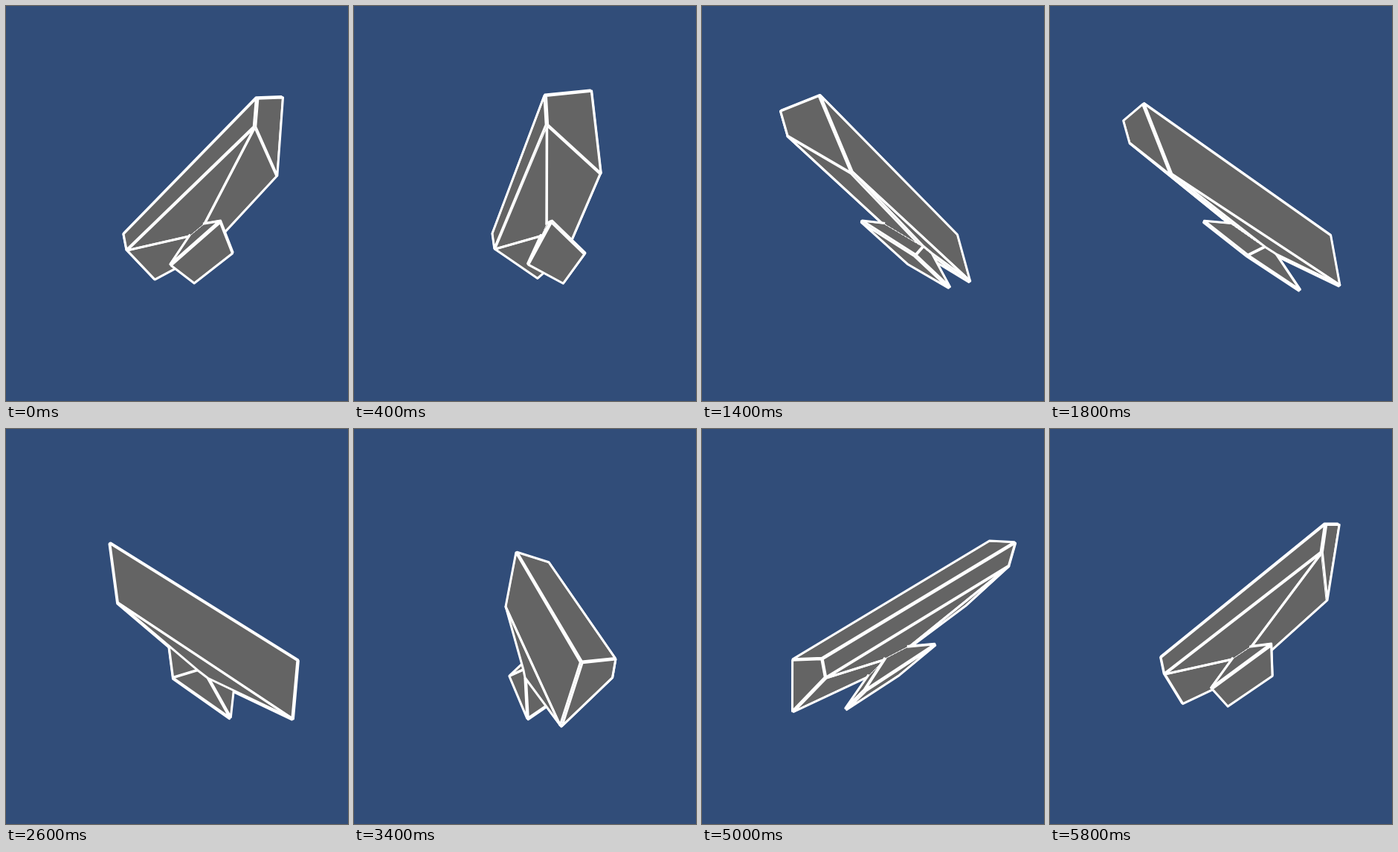
Recreate the animation shown at these times as an HTML page with a canvas. Size 460 by 530 pixels, loop 6 s.

```html
<!DOCTYPE html>
<html>
<head>
<meta charset="utf-8">
<style>
  html, body { margin: 0; width: 100%; height: 100%; overflow: hidden; background: #314d79; }
  canvas { display: block; }
</style>
</head>
<body>
<canvas id="stage" width="460" height="530"></canvas>
<script>
const ctx = document.getElementById('stage').getContext('2d');
const LOOP = 6000, STEP = 200;
const CAMERA = 742, CX = 260, CY = 290;
const LIFT = 1.4, LINE = 3;

// x, z (towards the viewer), y (up) at angle zero
const points = {
  A: [62.3, 144.8, 133.6], B: [96.4, 98, 145.2], C: [95, 61, 57.5], D: [60.6, 136.6, 104.5],
  E: [-106.5, -40.7, -16.7], F: [-102, -39, -38.8], G: [-69.3, -118.4, -88.1], H: [-87.2, -102.9, -19.3],
  J: [-11.5, -8, -17.5], K: [6, 15, -2.7], L: [17.5, -34.5, -32.5], M: [9, -47, -42],
  P: [26.2, 46, 0.7], Q: [45.5, -20.5, -42], R: [-7.7, -75, -89], S: [-39.2, -23, -58.8]
};

// Open faces end at the seam between bar and fin.
const underside = ['KDFJ', 'LCDK', 'JFGM'];
const shell = ['ABCD', 'EFGH', 'ABHE', 'ADFE', 'BCGH', 'CGML'];
const sides = ['JSPK', 'KPQL', 'LQRM', 'MRSJ'];
const fin = [...sides, 'PQRS'];
const openFaces = new Set([...underside, ...sides]);

const add = (a, b, k = 1) => a.map((v, i) => v + b[i] * k);
const dot = (a, b) => a[0] * b[0] + a[1] * b[1] + a[2] * b[2];
const mean = list => list.reduce((a, b) => add(a, b)).map(v => v / list.length);

function normal(poly, centre) {
  const [a, b, c, d] = poly;
  const u = add(c, a, -1), v = add(d, b, -1);
  const n = [u[1] * v[2] - u[2] * v[1], u[2] * v[0] - u[0] * v[2], u[0] * v[1] - u[1] * v[0]];
  const sign = dot(n, add(mean(poly), centre, -1)) < 0 ? -1 : 1;
  return n.map(k => sign * k / Math.hypot(...n));
}

function project([x, y, z]) {
  const s = CAMERA / (CAMERA - z);
  return [CX + x * s, CY - y * s];
}

function trace(poly, closed) {
  ctx.beginPath();
  poly.forEach(p => ctx.lineTo(...project(p)));
  if (closed) ctx.closePath();
}

function draw(time) {
  const angle = Math.floor(time % LOOP / STEP) * STEP / LOOP * 2 * Math.PI;
  const c = Math.cos(angle), s = Math.sin(angle);
  const turned = {};
  for (const k in points) {
    const [x, z, y] = points[k];
    turned[k] = [x * c - z * s, y, z * c + x * s];
  }
  const pick = names => [...names].map(k => turned[k]);
  const build = (names, body) => names.map(name => {
    const poly = pick(name), n = normal(poly, mean(pick(body)));
    const front = dot(n, add([0, 0, CAMERA], mean(poly), -1)) > 0;
    return { poly, n, front, closed: !openFaces.has(name) };
  });

  const outline = f => {
    trace(f.poly.map(p => add(p, f.n, LIFT)), f.closed);
    ctx.lineWidth = LINE;
    ctx.stroke();
  };
  const backs = faces => faces.filter(f => !f.front).forEach(outline);
  const fronts = faces => {
    const seen = faces.filter(f => f.front);
    seen.forEach(f => {
      trace(f.poly, true);
      ctx.fill();
    });
    seen.forEach(f => {
      outline(f);
      if (f.closed) return;
      trace([f.poly[3], f.poly[0]]);
      ctx.lineWidth = 1;
      ctx.setLineDash([4, 1]);
      ctx.stroke();
      ctx.setLineDash([]);
    });
  };

  ctx.fillStyle = '#314d79';
  ctx.fillRect(0, 0, 460, 530);
  ctx.fillStyle = '#646464';
  ctx.strokeStyle = '#fff';
  ctx.lineJoin = 'round';

  const under = build(underside, 'ABCDEFGH');
  const outer = build(shell, 'ABCDEFGH');
  const tail = build(fin, 'JKLMPQRS');
  backs(under);
  backs(outer);
  fronts(under);
  backs(tail);
  fronts(tail);
  fronts(outer);
}

const start = performance.now();
function tick() {
  draw(performance.now() - start);
  requestAnimationFrame(tick);
}
tick();
</script>
</body>
</html>
```
